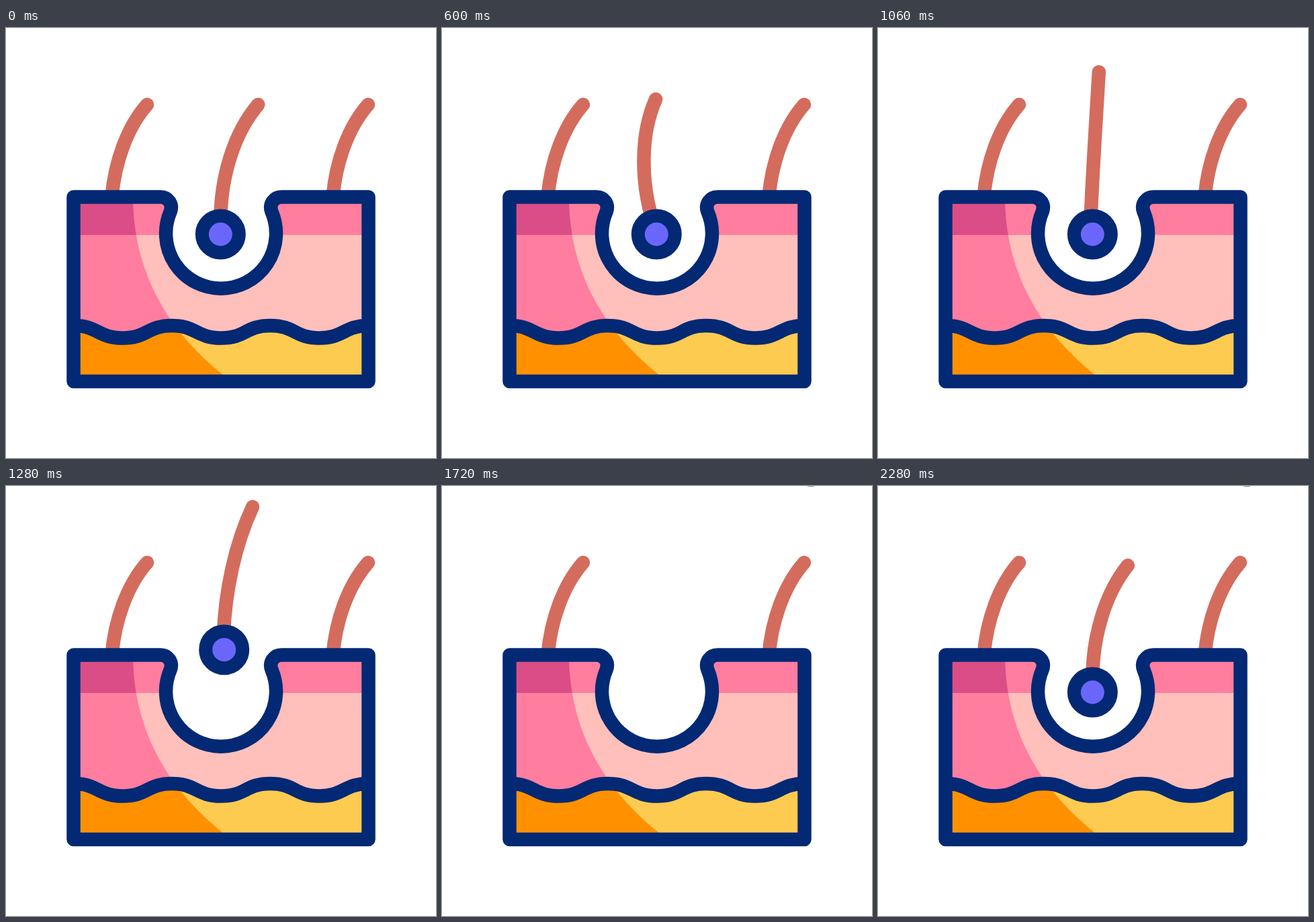
Write an HTML page that moves like this. It is 640 px wide and 640 px high and loops after 2400 ms.

```html
<!DOCTYPE html>
<html lang="en">
<head>
<meta charset="utf-8">
<title>Hair removal</title>
<style>
  html, body { margin: 0; width: 100%; height: 100%; overflow: hidden; background: #fff; }
  svg { display: block; width: 100vw; height: 100vh; }
  .line { fill: none; stroke: #032974; stroke-width: 20.5; stroke-linejoin: round; }
  .hair { fill: none; stroke: #d46c5e; stroke-width: 20.5; stroke-linecap: round; }
  .bulb { fill: #6b66fa; stroke: #032974; stroke-width: 20; }
</style>
</head>
<body>
<svg viewBox="0 0 640 640">
  <defs>
    <path id="skin" d="M100.5 251.5H230C241 251.5 249 262 244.6 273.5A82 82 0 1 0 395.4 273.5C391 262 399 251.5 410 251.5H539.5V526H100.5Z"/>
    <path id="shade" d="M100 251H189C189 365 243 455 330 522V530H100Z"/>
    <path id="side" class="hair" d="M157.5 251C162 200 180 148 210 114"/>
    <clipPath id="inSkin"><use href="#skin"/></clipPath>
    <clipPath id="inShade"><use href="#shade"/></clipPath>
  </defs>

  <use href="#side"/>
  <use href="#side" x="329"/>

  <g clip-path="url(#inSkin)">
    <path fill="#ffbfbb" d="M100 251H540V526H100Z"/>
    <path fill="#ff7d9f" d="M100 251H540V308H100Z"/>
    <path id="fat" fill="#fdcb50" d="M100.5 443C137 443 137 461.5 173.7 461.5S210 443 246.8 443S283 461.5 320 461.5S356 443 393.2 443S430 461.5 466.3 461.5S503 443 539.5 443V526H100.5Z"/>
    <g clip-path="url(#inShade)">
      <path fill="#ff7d9f" d="M100 308H340V526H100Z"/>
      <path fill="#db4d86" d="M100 251H340V308H100Z"/>
      <use href="#fat" style="fill:#ff9100"/>
      <path fill="#ff9100" d="M100.5 443C137 443 137 461.5 173.7 461.5S210 443 246.8 443S283 461.5 320 461.5H340V526H100.5Z"/>
    </g>
    <path class="line" d="M100.5 443C137 443 137 461.5 173.7 461.5S210 443 246.8 443S283 461.5 320 461.5S356 443 393.2 443S430 461.5 466.3 461.5S503 443 539.5 443"/>
  </g>
  <use href="#skin" class="line"/>

  <g id="plucked">
    <path id="strand" class="hair"/>
    <circle class="bulb" r="27.5"/>
  </g>
  <g id="fresh" transform="translate(319.3 307)">
    <path id="sprout" class="hair" pathLength="1"/>
    <circle id="seed" class="bulb" r="27.5"/>
  </g>
</svg>
<script>
  const LOOP = 2400;
  const $ = id => document.getElementById(id);
  const set = (id, name, value) => $(id).setAttribute(name, value);
  const clamp = u => Math.min(1, Math.max(0, u));
  const mix = (a, b, u) => a + (b - a) * u;
  const smooth = u => u * u * (3 - 2 * u);
  const span = (t, a, b) => clamp((t - a) / (b - a));

  // Hair curves relative to the bulb centre
  const relaxed = [0, -20, 0, -85, 20, -151, 56, -193];
  const taut = [2, -20, 23, -91, 46, -162, 68, -232];

  // Keys are [time, value] pairs
  const tilt = [[0, 0], [540, -16.5], [600, -16.5], [780, 0], [1150, -16.5], [1400, 5], [1600, 15]];
  const pull = [[0, 0], [330, 1], [590, 0], [780, 0], [1060, 1], [1120, 1], [1400, 0]];

  function track(keys, t) {
    for (let i = 1; i < keys.length; i++) {
      const [a, from] = keys[i - 1], [b, to] = keys[i];
      if (t < b) return mix(from, to, smooth(span(t, a, b)));
    }
    return keys[keys.length - 1][1];
  }

  function hairPath(k) {
    const p = relaxed.map((v, i) => mix(v, taut[i], k));
    return `M${p.slice(0, 2)}C${p.slice(2)}`;
  }

  function draw(t) {
    const s = span(t, 1100, 1600) ** 1.85;
    const x = 319.3 + 229.7 * s * s;
    const y = 307 * (1 - s) ** 2 + 2 * 93 * s * (1 - s) - 37 * s * s;
    set('plucked', 'transform', `translate(${x} ${y})`);
    set('strand', 'd', hairPath(track(pull, t)));
    set('strand', 'transform', `rotate(${track(tilt, t)})`);

    const size = smooth(span(t, 1760, 2140));
    const grown = span(t, 2150, 2285);
    set('fresh', 'visibility', size > 0 ? 'visible' : 'hidden');
    set('seed', 'transform', `scale(${size})`);
    set('sprout', 'stroke-dasharray', `${grown} 2`);
    set('sprout', 'display', grown > 0 ? 'inline' : 'none');
  }

  set('sprout', 'd', hairPath(0));
  function tick() {
    draw(performance.now() % LOOP);
    requestAnimationFrame(tick);
  }
  tick();
</script>
</body>
</html>
```
